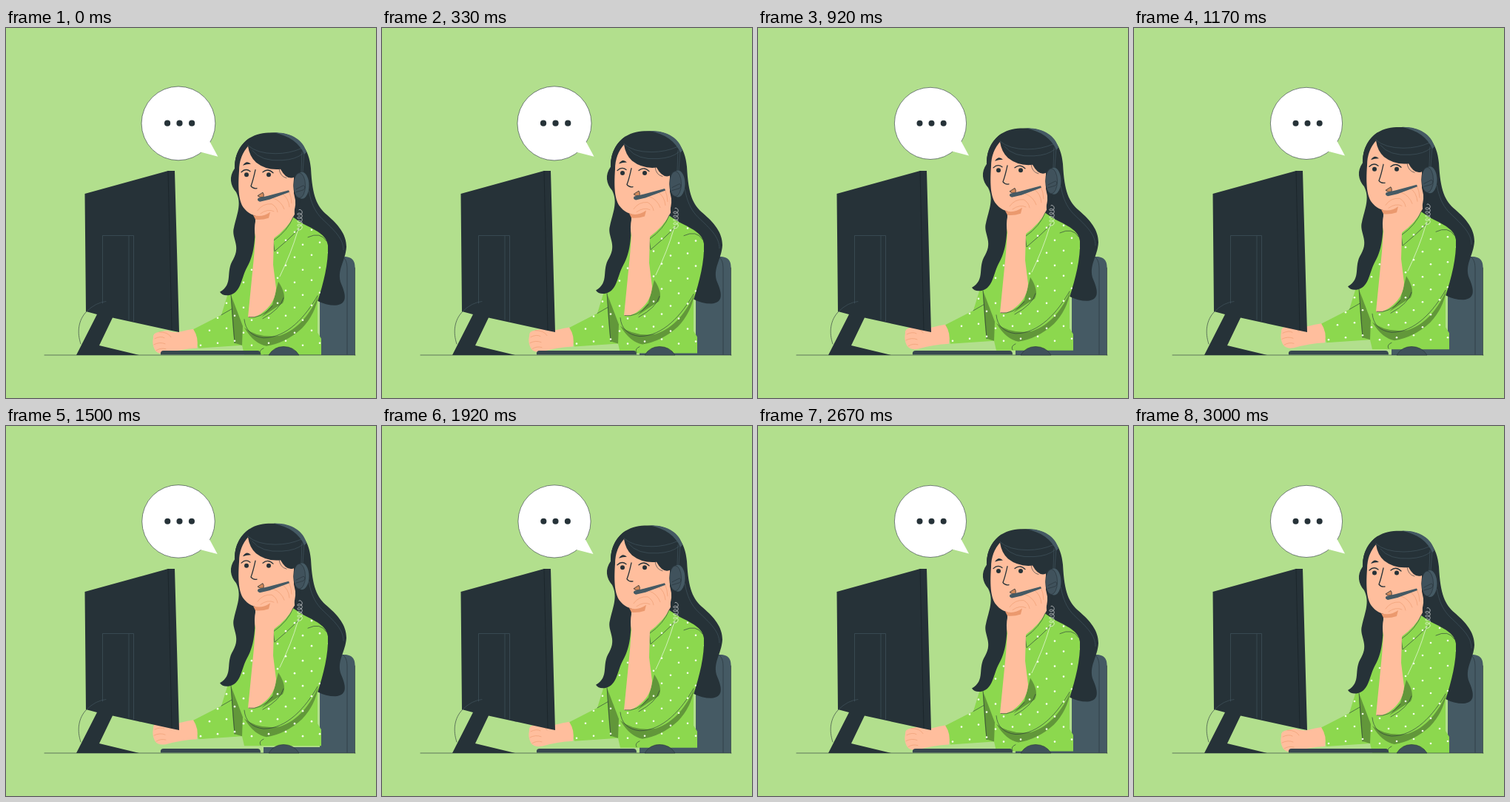
Animation, 500 px wide and 500 px high, one loop 3040 ms. Source, as an HTML page:

```html
<!DOCTYPE html>
<html lang="en">
<head>
<meta charset="utf-8">
<title>Support agent</title>
<style>
  html, body { margin: 0; width: 100%; height: 100%; overflow: hidden; background: #b2df8d; }
  svg { display: block; width: 100%; height: 100%; }
  .dark { fill: #263238; }
  .slate { fill: #455a64; }
  .skin { fill: #ffbe9d; }
  .green { fill: #8cd84e; }
  .shade { fill: #62973a; }
  .ink, .bold, .thin, .fold, .wire { fill: none; stroke: #263238; stroke-width: .6; stroke-linecap: round; stroke-linejoin: round; }
  .bold { stroke-width: 1.3; }
  .thin { stroke: #455a64; }
  .fold { stroke: #eb996e; }
  .wire { stroke: #fff; }
</style>
</head>
<body>
<svg viewBox="0 0 500 500">
  <!-- chair -->
  <path class="slate" d="M348 434H424V309H459Q471 310 471.500 322V442H348Z"/>
  <path class="ink" d="M455 309Q461 313 461 324V441M471.500 324V442"/>

  <g id="agent">
    <!-- back hair -->
    <path class="dark" d="M309 188C309 170 318 156 329 149C340 142 354 141 366 142C396 143 410 164 412 190C414 228 420 241 434 253C449 266 460 279 460 296C459 315 446 328 453 346C460 362 461 374 445 375Q432 375 421 369L415 300L380 255L320 250Z"/>
    <path class="thin" d="M405 175C407 220 411 242 427 258C444 274 456 285 456 300"/>

    <!-- shirt -->
    <clipPath id="cloth"><use href="#shirt"/></clipPath>
    <path id="shirt" class="green" d="M314 288L307 325L299 362L291 388L252 408L260 433L319 429L322 442H426V420L421 412V370C429 345 436 318 435 294C433 281 424 276 400 264L388 256L335 275Z"/>
    <path class="shade" d="M304 361L320 403L319 429L309 426Q306 409 304 361Z"/>
    <path class="shade" d="M322 405Q340 420 370 416C395 408 412 385 422 362Q418 387 400 406Q378 426 352 430Q335 427 322 405Z"/>
    <path class="shade" d="M368 343Q380 361 374 372Q360 381 345 391L360 374Z"/>
    <path class="ink" d="M291 388L305 380M304 361L309 426M322 394Q324 416 348 419C380 419 405 390 421 362M408 283Q425 275 433 288M348 433Q341 436 344 441"/>

    <!-- neck and collar -->
    <path class="skin" d="M337 245L389 225L390 252Q382 270 360 286H337Z"/>
    <path class="green" d="M388 256L401 268Q382 287 363 302L358 289Q380 275 388 256Z"/>
    <path class="ink" d="M388 256Q381 274 361 288L363 302Q381 287 398 270"/>

    <g id="spots" fill="#f4ffe9" clip-path="url(#cloth)"></g>

    <!-- left strand -->
    <path class="dark" d="M329 149C313 160 309 176 309 190C301 201 303 213 311 222C319 238 312 252 308 270C304 284 318 294 307 313C296 330 308 346 289 357Q293 363 303 361C318 357 318 337 326 323C337 304 337 280 337 250L345 190Z"/>

    <!-- face -->
    <path class="skin" d="M328 159Q315 173 315 193C313 220 315 235 321 243C329 254 345 259 357 251L389 240V190L350 165Z"/>
    <circle class="dark" cx="325" cy="198.500" r="3"/>
    <circle class="dark" cx="355" cy="198.500" r="3"/>
    <path class="bold" d="M318 195Q324 189 330 194M347 195Q354 189 361 196M337 192Q334 206 331 214Q334 218 339 217"/>
    <path class="dark" d="M320 186Q325 178 331 184Q325 184 320 186ZM349 188Q355 183 361 188Q355 186 349 188Z"/>
    <path d="M340 227L347 222.500Q349 225 348 229Q343 230 340 227Z" fill="#d18a5b" stroke="#263238" stroke-width=".8"/>

    <!-- fringe -->
    <path class="dark" d="M327 160C335 146 352 141 367 142C394 143 409 162 410 189V220L390 215L389 202Q379 206 371 191Q352 193 338 182Q329 174 327 160Z"/>
    <path class="ink" d="M369 190Q370 201 379 203M373 190Q378 200 388 200"/>
    <path class="thin" d="M327 159Q339 170 364 170Q383 170 399 163M333 166Q345 181 373 179Q392 178 401 170"/>

    <!-- headset -->
    <path class="slate" d="M362 141.500C386 141 402 152 406 168L403 171C397 156 383 146 362 141.500Z"/>
    <path class="thin" d="M403 168L401 195M400 168L399 195"/>
    <path class="ink" d="M398 229L395 247"/>
    <path class="wire" id="coil"/>
    <ellipse class="slate" cx="400" cy="213" rx="9.500" ry="18"/>
    <ellipse cx="396.500" cy="213" rx="8" ry="17" fill="#40525c" stroke="#263238" stroke-width=".6"/>
    <path class="ink" d="M392 218L402 213Q406 215 402 219L392 222"/>

    <!-- raised arm -->
    <path class="skin" d="M337 283C334 267 338 253 345 243Q350 233 361 228L382 219Q386 215 388 219L391 233Q392 245 386 254C378 267 365 272 362 285L361 320L365 352Q364 370 350 382Q338 393 327 391L335 310Z"/>
    <path class="fold" d="M340 247Q347 237 359 238Q366 242 367 249M344 251Q354 244 362 248M361 230Q372 234 376 245M373 224Q382 230 383 242M382 220Q386 229 386 237"/>
    <path d="M334 253Q346 257 357 249L355 257Q346 260 337 259Z" fill="#eb996e"/>
    <path class="slate" d="M341 230L354 227L382 219.500L383 222L356 232L343 235Q338 233 341 230Z"/>
    <path class="ink" d="M328 391Q344 394 360 376M375 365Q371 380 347 393"/>

    <!-- resting fist -->
    <path class="skin" d="M199 419Q198 412 207 411L217 409Q226 412 234 411Q246 408 253 407Q261 419 258 433Q237 434 216 440Q205 442 201 435Q197 427 199 419Z"/>
    <path class="fold" d="M201 420Q209 416 214 419M200 428Q208 424 215 427M203 436Q209 432 216 434M207 411Q219 411 223 418"/>
  </g>

  <!-- desk -->
  <path class="ink" d="M52 442H472"/>
  <path d="M209 441.500Q208 436 213 436H340Q344 436 344 441.500Z" fill="#37474f"/>
  <path d="M355 442Q362 430.500 375 430.500Q389 430.500 396 442Z" fill="#40525b" stroke="#263238" stroke-width=".6"/>

  <!-- monitor -->
  <path class="dark" d="M106.500 224L219 193H228L234 411L224 409L144 391.500L126 429L180 442H95L123 387L108 383Z"/>
  <path class="thin" d="M130.500 372V280.500H172.500V396M166 394V281M135 369.500Q121 371 109 383"/>
  <path class="ink" d="M109 383C97 395 96 412 101 427"/>
  <path fill="none" stroke="#1a2429" stroke-width=".8" d="M219 193L224 408"/>

  <g id="bubble">
    <circle cx="233" cy="128.900" r="48.600" fill="#fff" stroke="#263238" stroke-width=".6"/>
    <path d="M262 166.500L285 172.500L274.500 153Z" fill="#fff"/>
    <g class="dark">
      <circle cx="218.500" cy="128.700" r="4"/>
      <circle cx="234.500" cy="128.700" r="4"/>
      <circle cx="250.700" cy="128.700" r="4"/>
    </g>
  </g>
</svg>
<script>
const $ = id => document.getElementById(id);

// Staggered polka dots, clipped to the shirt.
let spots = '';
for (let row = 0; row < 10; row++)
  for (let col = 0; col < 9; col++)
    spots += `<circle cx="${252 + col * 23 + row % 2 * 11}" cy="${276 + row * 17 - col % 3 * 3}" r="1.3"/>`;
$('spots').innerHTML = spots;

// Curled cable, then the straight run down the shirt.
let coil = 'M396 246';
for (let a = 0; a < 10 * Math.PI; a += .3)
  coil += `L${(397 + 3.2 * Math.sin(a)).toFixed(1)} ${(248 + a * .8 - 2.4 * Math.cos(a)).toFixed(1)}`;
$('coil').setAttribute('d', coil + 'L394 275Q386 303 370 336');

const LOOP = 3040, STEPS = 75, STEP = 40, FLOAT = 3000, BEAT = 1500;

// Linear rise to 1 at the peak, then linear fall.
const bump = (p, peak, rise, fall) =>
  Math.max(0, 1 - (p < peak ? (peak - p) / rise : (p - peak) / fall));

function draw(now) {
  const time = (Math.floor(now % LOOP / LOOP * STEPS) + 1) * STEP % FLOAT;
  const lift = 10 * bump(time / FLOAT, .5, .5, .5);
  $('agent').setAttribute('transform', `translate(0 ${-lift})`);
  const p = time % BEAT / BEAT;
  const scale = 1 + .1 * (bump(p, .1, .1, .2) + bump(p, .5, .1, .1));
  $('bubble').setAttribute('transform', `translate(234 128.7) scale(${scale}) translate(-234 -128.7)`);
}

const start = performance.now();
function tick() {
  draw(performance.now() - start);
  requestAnimationFrame(tick);
}
tick();
</script>
</body>
</html>
```
